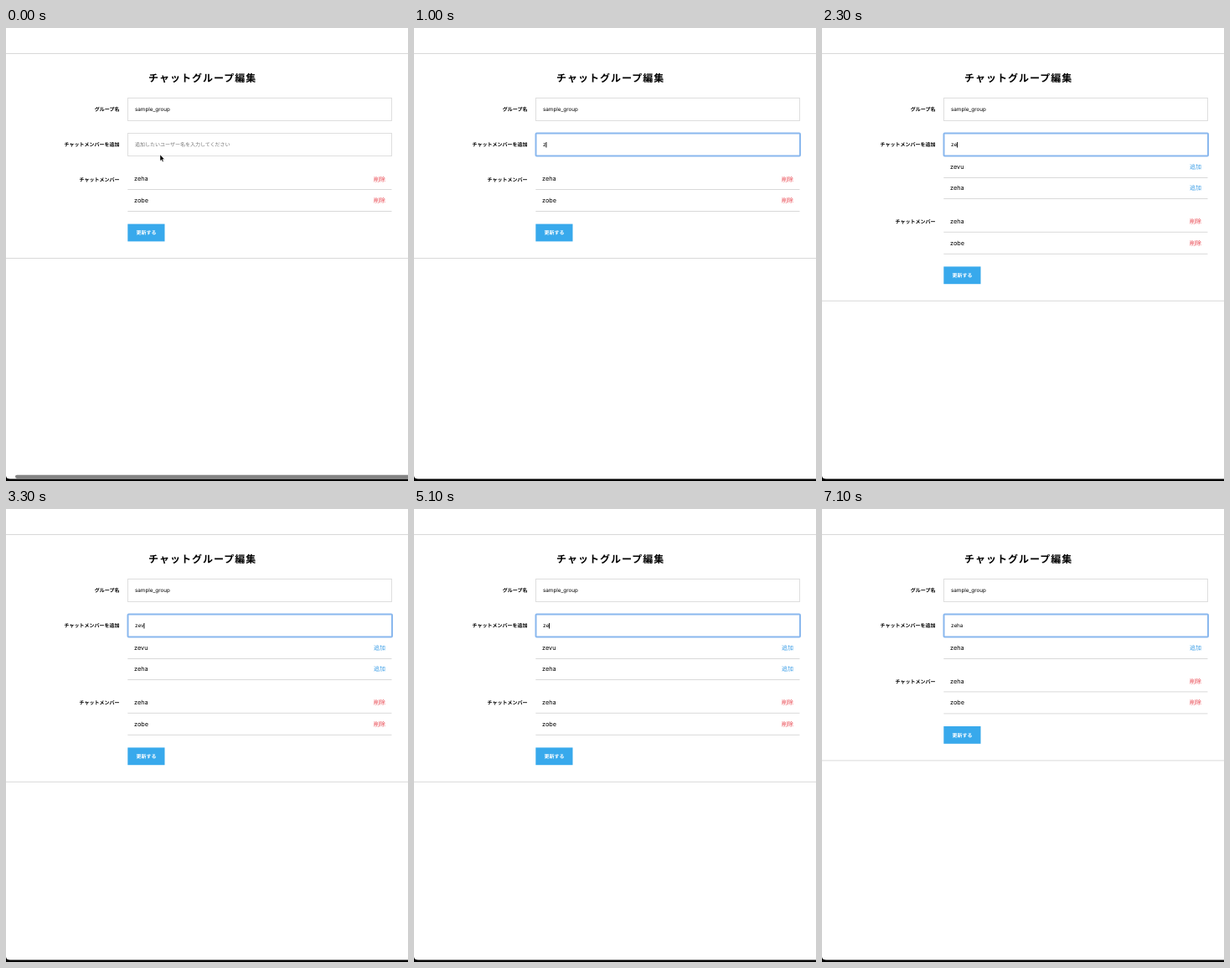
An HTML page for the animation above (7200 ms loop, 480 by 540 pixels).

```html
<!DOCTYPE html>
<html lang="ja">
<head>
<meta charset="utf-8">
<title>チャットグループ編集</title>
<style>
  html, body { margin: 0; width: 100%; height: 100%; overflow: hidden; background: #fff; }
  svg { display: block; width: 480px; height: 540px; }
  text { font: 6px "Noto Sans CJK JP", "Noto Sans CJK", sans-serif; text-rendering: geometricPrecision; white-space: pre; }
  .title { font-size: 12px; font-weight: 700; letter-spacing: 1px; }
  .label { font-weight: 700; text-anchor: end; }
  .value { font: 6.3px Inter, Arial, sans-serif; }
  .name { font: 7.3px Inter, Arial, sans-serif; }
  .action { font-size: 7px; text-anchor: end; }
  .add { fill: #3a9de6; }
  .remove { fill: #e8404a; }
  .rule { stroke: #d9d9d9; fill: none; }
  .field { stroke: #dedede; fill: #fff; }
</style>
</head>
<body>
<svg viewBox="0 0 480 540">
  <path class="rule" d="M0 30.5H480"/>
  <text class="title" x="170" y="64">チャットグループ編集</text>

  <text class="label" x="135.5" y="98.6">グループ名</text>
  <rect class="field" x="145.5" y="83.5" width="315" height="27"/>
  <text class="value" x="154" y="99.4">sample_group</text>

  <text class="label" x="135.5" y="140.6">チャットメンバーを追加</text>
  <rect class="field" x="145.5" y="125.5" width="315" height="27"/>
  <text id="placeholder" x="154" y="141.4" fill="#757575">追加したいユーザー名を入力してください</text>
  <rect id="ring" x="145.5" y="125.5" width="315.5" height="27" rx="1" fill="none" stroke="#8ab8ee" stroke-width="2"/>
  <text id="query" class="value" x="154" y="141.4"></text>
  <rect id="caret" y="136" width=".9" height="6.5"/>

  <g id="results"></g>
  <g id="lower">
    <text class="label" x="135.5" y="182.6">チャットメンバー</text>
    <g id="members"></g>
    <rect x="145.3" y="233.6" width="44.2" height="20.8" fill="#38a9ec"/>
    <text x="167.4" y="246.3" fill="#fff" font-weight="700" text-anchor="middle" style="font-weight:700">更新する</text>
    <path class="rule" d="M0 274.5H480"/>
  </g>

  <rect id="scrollbar" x="11" y="532.7" width="480" height="4.2" rx="2.1" fill="#858585"/>
  <path d="M0 534Q.5 537.6 5 537.6H480V540H0Z"/>
  <path id="pointer" d="M184 151v7.4l1.7-1.5 1.2 2.6 1.2-.6-1.1-2.5h2.2z" stroke="#fff" stroke-width=".4"/>
</svg>
<script>
const LOOP = 7200, FOCUS = 200, BLINK = 500, ROW = 25.4;
const $ = id => document.getElementById(id);

// [time, text in the field]
const keys = [[0, ''], [FOCUS, ''], [900, 'z'], [1200, 'ze'], [3100, 'zev'],
  [5100, 'ze'], [6100, 'zeh'], [6400, 'zeha']];
// [time, names found]
const searches = [[0, ''], [1100, 'zevu zeha zobe zolu'], [1300, 'zevu zeha'],
  [3400, 'zevu'], [5100, 'zevu zeha'], [6300, 'zeha']];

const latest = (list, t) => list.filter(item => item[0] <= t).pop();

function rows(names, top, kind, action) {
  return names.map((name, i) => {
    const y = top + i * ROW;
    return `<text class="name" x="153" y="${y + 15}">${name}</text>
      <text class="action ${kind}" x="453" y="${y + 15.1}">${action}</text>
      <path class="rule" d="M145.3 ${Math.floor(y + ROW) + .5}H460.5"/>`;
  }).join('');
}

$('members').innerHTML = rows(['zeha', 'zobe'], 167.4, 'remove', '削除');

let shown;
function showResults(found) {
  if (found === shown) return;
  shown = found;
  const names = found.split(' ').filter(Boolean);
  $('results').innerHTML = rows(names, 152.6, 'add', '追加');
  $('lower').setAttribute('transform', `translate(0 ${names.length * ROW})`);
}

const toggle = (id, on) => $(id).setAttribute('visibility', on ? 'visible' : 'hidden');

function draw() {
  const t = performance.now() % LOOP;
  const [pressed, text] = latest(keys, t);
  const focused = t >= FOCUS;

  $('query').textContent = text;
  $('caret').setAttribute('x', 154 + $('query').getComputedTextLength());
  toggle('caret', focused && Math.floor((t - pressed) / BLINK) % 2 === 0);
  toggle('placeholder', !text);
  toggle('ring', focused);
  toggle('pointer', !focused);
  $('scrollbar').setAttribute('opacity', Math.max(0, Math.min(1, (300 - t) / 200)));
  showResults(latest(searches, t)[1]);
  requestAnimationFrame(draw);
}
draw();
</script>
</body>
</html>
```
